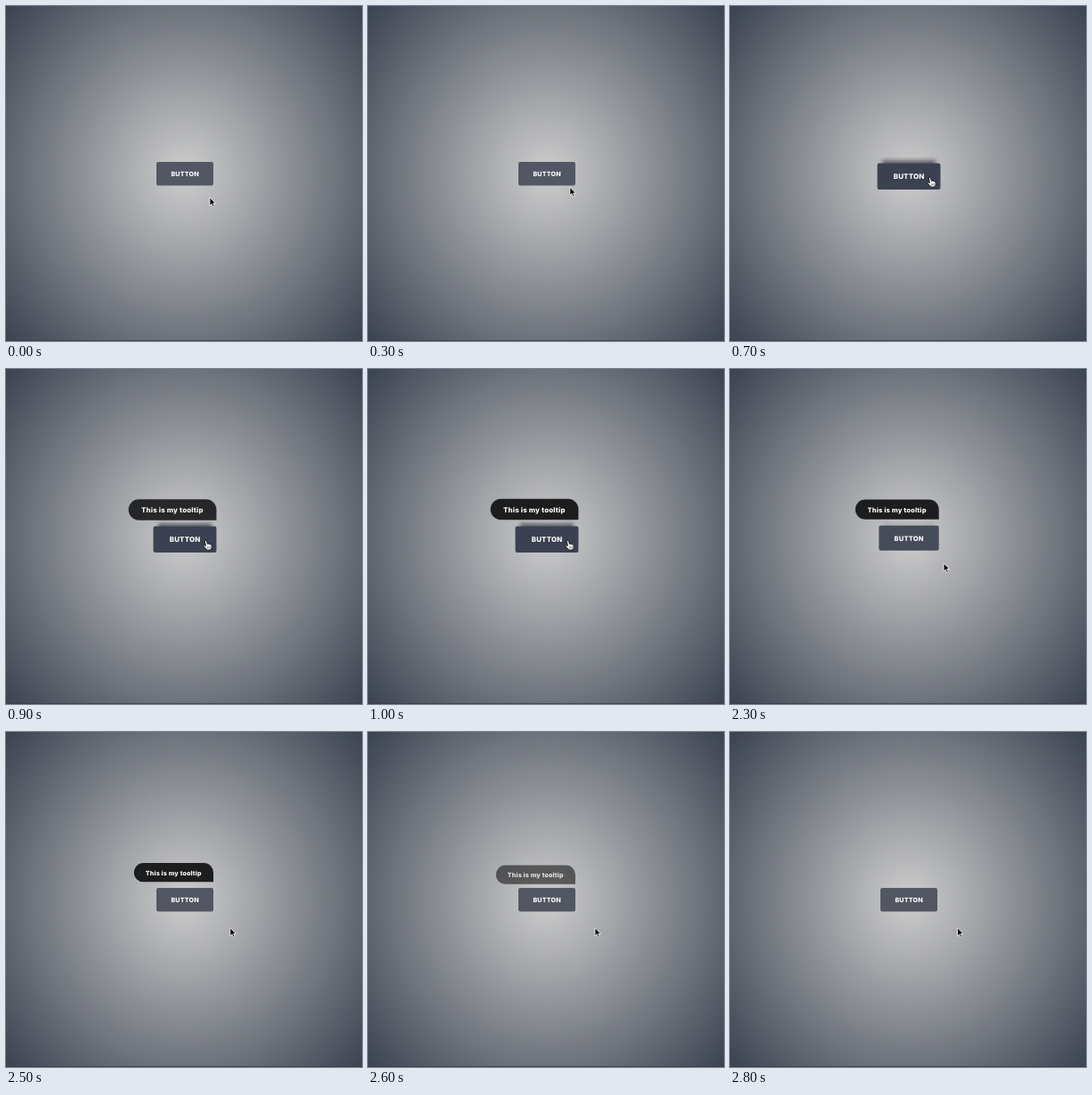
Animation of 400x376 px, one loop 3 s. Source, as an HTML page:

```html
<!DOCTYPE html>
<html lang="en">
<head>
<meta charset="utf-8">
<title>Button tooltip</title>
<style>
  html, body { margin: 0; width: 100%; height: 100%; overflow: hidden; background: #3d4553; }
  svg { display: block; width: 100vw; height: 100vh; }
  text { font-family: Inter, "Open Sans", sans-serif; font-weight: 800; fill: #fff; text-anchor: middle; text-rendering: geometricPrecision; }
</style>
</head>
<body>
<svg viewBox="0 0 400 376">
  <defs>
    <radialGradient id="glow" gradientUnits="userSpaceOnUse" cx="0" cy="0" r="1" gradientTransform="translate(201 188) scale(262 280)">
      <stop offset="0" stop-color="#cdcdcd"/>
      <stop offset="1" stop-color="#3d4553"/>
    </radialGradient>
    <filter id="soft" x="-30%" y="-60%" width="160%" height="220%">
      <feGaussianBlur stdDeviation="2"/>
    </filter>
  </defs>
  <rect width="400" height="376" fill="url(#glow)"/>
  <rect y="375" width="400" height="1" fill="#393e49" opacity=".8"/>
  <g id="widget">
    <rect id="shadow" x="-27" y="-16.5" width="54" height="22" fill="#22242c" filter="url(#soft)"/>
    <g id="tooltip">
      <path d="M-46.6 -41.1H21.4A10.6 10.6 0 0 1 32 -30.5V-19.9H-46.6A10.6 10.6 0 0 1 -46.6 -41.1Z" fill="#1c1d1e"/>
      <text x="-12.8" y="-27.7" font-size="7.1" letter-spacing=".17">This is my tooltip</text>
    </g>
    <rect id="button" x="-32" y="-13.3" width="64" height="26.6" rx="2"/>
    <text x=".1" y="2.7" font-size="7.1" letter-spacing=".2">BUTTON</text>
  </g>
  <g id="cursor" stroke-linejoin="round">
    <path id="arrow" d="M0 0V9.2L2.1 7.2L3.6 10.6L5.2 9.9L3.7 6.6H6.6Z" fill="#000" stroke="#fff" stroke-width=".8"/>
    <g id="hand" transform="translate(-1 .7)" stroke="#111" stroke-width=".9">
      <path d="M-.2 1.3Q-.5 0 .6 -.1Q1.4 -.1 1.8 1L2.8 4Q3.8 3.2 4.5 4.1Q5.5 3.5 6.1 4.5Q7.2 4.3 7.4 5.5L7.5 7.6L6.8 10.3L2.3 10.7L-.8 7.5Q-2.5 5.8 -1.8 5.3Q-.9 4.8 .7 6.2Z" fill="#fff"/>
      <path d="M2.8 7V9M4.2 6.8V8.9M5.6 6.6V8.8" stroke-width=".5"/>
    </g>
  </g>
</svg>
<script>
  const LOOP = 3000, STEP = 100;
  const ENTER = 375, LEAVE = 2210, DELAY = 320, DURATION = 300;
  const BASE = [82, 87, 99], HOVER = [59, 65, 81];

  const $ = id => document.getElementById(id);
  const clamp = v => Math.min(1, Math.max(0, v));
  const mix = (a, b, k) => a + (b - a) * k;
  const bezier = (u, a, b) => 3 * (1 - u) ** 2 * u * a + 3 * (1 - u) * u * u * b + u ** 3;

  // CSS "ease"
  function ease(x) {
    let low = 0, high = 1;
    for (let i = 0; i < 24; i++) {
      const mid = (low + high) / 2;
      if (bezier(mid, .25, .25) < x) low = mid; else high = mid;
    }
    return bezier(low, .1, 1);
  }

  const ramp = (t, start) => ease(clamp((t - start) / DURATION));
  const hoverAt = t => t < LEAVE ? ramp(t, ENTER) : 1 - ramp(t, LEAVE);

  function glide(t, start, end) {
    const k = clamp((t - start) / (end - start));
    return k * k * (3 - 2 * k);
  }

  // Move onto the button, then away with a curve to the right.
  function pointerAt(t) {
    const arrive = glide(t, 0, 600);
    return [
      229 - 4.3 * arrive + 30.8 * glide(t, 1950, 2650),
      215 - 23.2 * arrive + 28 * glide(t, 2060, 2345)
    ];
  }

  function draw(t) {
    const hover = hoverAt(t), shown = hoverAt(t - DELAY);
    const leaving = t >= LEAVE + DELAY;
    const tip = leaving ? 1 - ramp(t, LEAVE + DELAY) : shown;
    const color = BASE.map((c, i) => Math.round(mix(c, HOVER[i], hover)));
    $("widget").setAttribute("transform", `translate(201 ${188.2 + 3.1 * hover}) scale(${1 + .108 * hover})`);
    $("button").setAttribute("fill", `rgb(${color})`);
    $("shadow").setAttribute("opacity", .58 * hover * hover);
    $("tooltip").setAttribute("opacity", tip < .01 ? 0 : tip);
    $("tooltip").setAttribute("transform", `translate(0 ${6.6 * (1 - tip)})`);

    const over = t >= ENTER && t < LEAVE;
    $("cursor").setAttribute("transform", `translate(${pointerAt(t)})`);
    $("hand").setAttribute("visibility", over ? "visible" : "hidden");
    $("arrow").setAttribute("visibility", over ? "hidden" : "visible");
  }

  const origin = performance.now();
  function tick() {
    const t = (performance.now() - origin) % LOOP;
    draw(Math.floor(t / STEP) * STEP);
    requestAnimationFrame(tick);
  }
  tick();
</script>
</body>
</html>
```
